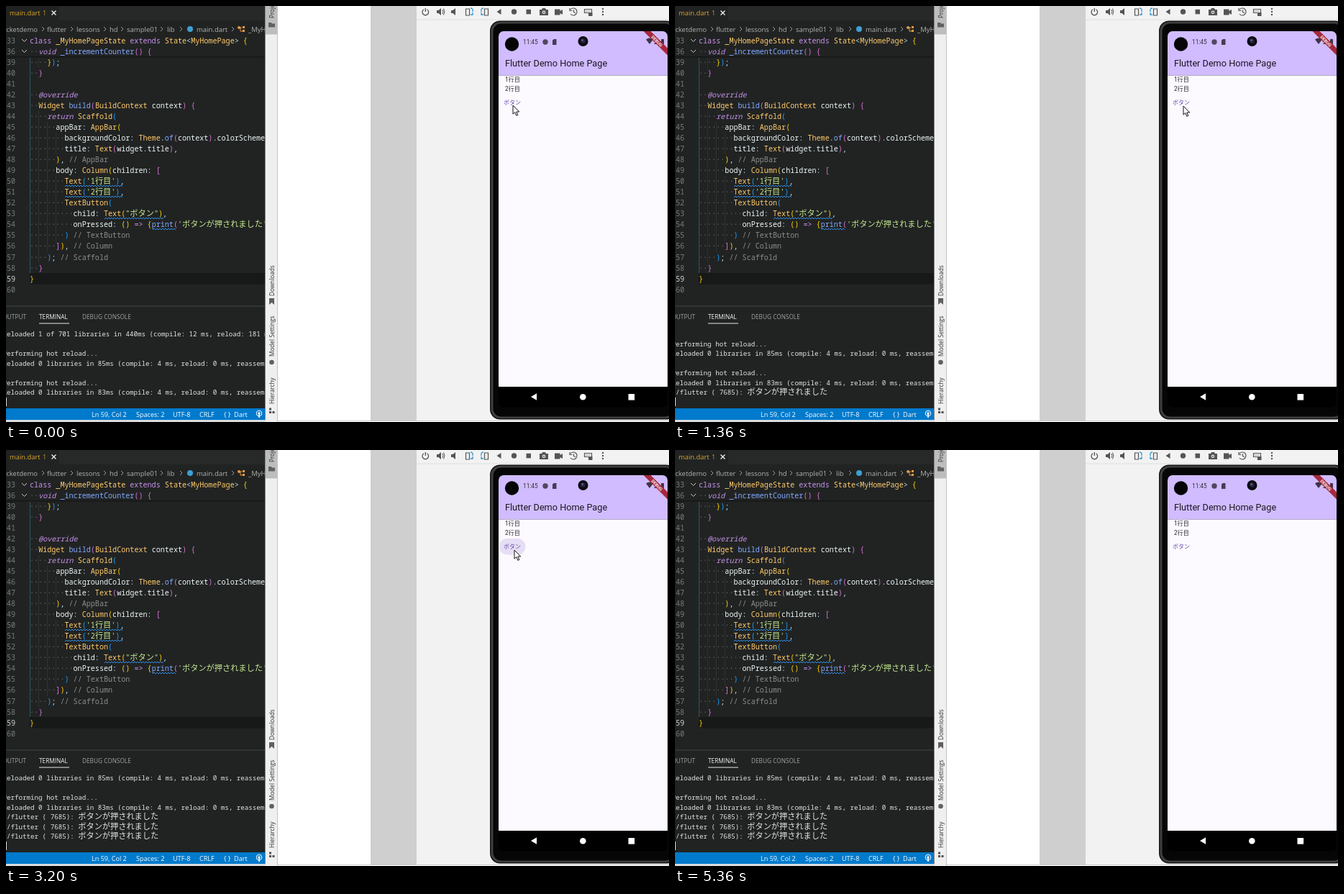
Recreate the animation shown at these times as an HTML page. Size 922 px wide and 578 px high, loop 5.44 s.

```html
<!DOCTYPE html>
<html lang="ja">
<head>
<meta charset="utf-8">
<style>
html, body { margin: 0; width: 100%; height: 100%; overflow: hidden; background: #fff; }
svg { display: block; width: 922px; height: 578px; }
text { white-space: pre; }
.ui { font-family: "Open Sans", "Noto Sans", sans-serif; }
.mono { font-family: "Noto Sans Mono", "Noto Sans CJK JP", monospace; font-weight: 500; }
.cjk { font-family: "Noto Sans CJK JP", "Noto Sans CJK", sans-serif; font-weight: 400; }
.app { font-family: Roboto, "Noto Sans CJK JP", sans-serif; }
</style>
</head>
<body>
<svg id="stage" viewBox="0 0 922 578" xmlns="http://www.w3.org/2000/svg"></svg>
<script>
const LOOP = 5440, STEP = 80;
const BG = '#212323';

const escape = s => s.replace(/&/g, '&amp;').replace(/</g, '&lt;').replace(/>/g, '&gt;');
const rect = (x, y, w, h, fill, extra = '') =>
  `<rect x="${x}" y="${y}" width="${w}" height="${h}" fill="${fill}" ${extra}/>`;
const circle = (x, y, r, fill, extra = '') =>
  `<circle cx="${x}" cy="${y}" r="${r}" fill="${fill}" ${extra}/>`;
const path = (d, fill, extra = '') => `<path d="${d}" fill="${fill}" ${extra}/>`;
const line = (d, color, width = 1, extra = '') =>
  path(d, 'none', `stroke="${color}" stroke-width="${width}" ${extra}`);
const rawText = (x, y, markup, size, fill, cls, extra = '') =>
  `<text x="${x}" y="${y}" font-size="${size}" fill="${fill}" class="${cls}" ${extra}>${markup}</text>`;
const label = (x, y, s, size, fill, cls = 'ui', extra = '') =>
  rawText(x, y, escape(s), size, fill, cls, extra);

// Full-width characters are set larger than the code around them.
const wide = s => escape(s).replace(/[\u3040-\u30ff\u4e00-\u9fff]+/g,
  run => `<tspan class="cjk" font-size="11.2">${run}</tspan>`);

// Code colouring
const BRACKETS = ['#ffd700', '#da70d6', '#179fff'];
const TOKENS = [
  [/^\/\/.*/, '#8b8d8d'],
  [/^'[^']*'?|^"[^"]*"/, '#c3e88d'],
  [/^(void|return|@override)\b/, '#c792ea', 'italic'],
  [/^(class|extends)\b/, '#c792ea'],
  [/^(_MyHomePageState|State|MyHomePage|Widget|BuildContext|Scaffold|AppBar|Theme|TextButton|Text|Column)\b/, '#ffcb6b'],
  [/^(_incrementCounter|build|of|print)\b(?=\()/, '#82aaff'],
  [/^ +/, BG],
  [/^\w+/, '#eef6f6'],
  [/^=>/, '#c792ea'],
  [/^[^\w\s]/, '#b3dfee']
];
let depth = 0;
function colorize(source) {
  const indent = source.match(/^ */)[0].length;
  let rest = source.slice(indent);
  let out = `<tspan fill="#686e70">${'·'.repeat(indent)}</tspan>`;
  while (rest) {
    const [rule, color, style] = TOKENS.find(([r]) => r.test(rest));
    const word = rest.match(rule)[0];
    let fill = color;
    if (/^[([{]$/.test(word)) fill = BRACKETS[depth++ % 3];
    else if (/^[)\]}]$/.test(word)) fill = BRACKETS[--depth % 3];
    out += `<tspan fill="${fill}"${style ? ' font-style="italic"' : ''}>${wide(word)}</tspan>`;
    rest = rest.slice(word.length);
  }
  return out;
}
const CODE = [
  '    });',
  '  }',
  '',
  '  @override',
  '  Widget build(BuildContext context) {',
  '    return Scaffold(',
  '      appBar: AppBar(',
  '        backgroundColor: Theme.of(context).colorScheme.inversePrimary,',
  '        title: Text(widget.title),',
  '      ), // AppBar',
  '      body: Column(children: [',
  "        Text('1行目'),",
  "        Text('2行目'),",
  '        TextButton(',
  '          child: Text("ボタン"),',
  "          onPressed: () => {print('ボタンが押されました')},",
  '        ) // TextButton',
  '      ]), // Column',
  '    ); // Scaffold',
  '  }',
  '}',
  ''
];
const codeRow = (number, y, source) =>
  label(1, y + 3.6, String(number), 10.1, number === 59 ? '#d0d0d0' : '#767b7d', 'mono') +
  rawText(33, y + 3.6, colorize(source), 10.1, '#eef6f6', 'mono');
function squiggle(x1, x2, y) {
  let d = `M${x1} ${y}`;
  for (let x = x1, up = true; x < x2; x += 2, up = !up) d += `l2 ${up ? -2 : 2}`;
  return line(d, '#2f8ee8', 1);
}

function editor() {
  let s = rect(0, 0, 361, 575, BG) + rect(74, 0, 287, 20, '#272929');
  s += label(5, 13, 'main.dart', 9.4, '#dda72a') + label(51, 13, '1', 9, '#c2942a');
  s += line('M63.5 6.5l6 6m0-6l-6 6', '#f0f0f0', 1.3);

  s += label(44, 35.5, 'pocketdemo', 9.5, '#b0b2b2', 'ui', 'text-anchor="end"');
  [[57, 'flutter'], [98, 'lessons'], [144, 'hd'], [168, 'sample01'], [224, 'lib'], [265, 'main.dart'], [337, '_MyHomePageState']]
    .forEach(([x, name]) => s += label(x, 35.5, name, 9.5, '#b0b2b2'));
  [50, 90, 136, 160, 215, 242, 314].forEach(x => s += line(`M${x} 29l3 3l-3 3`, '#999c9c'));
  s += circle(256, 32, 4, '#3f9fd3');
  s += line('M324 30h4m-2 0v5h4', '#e59b45') + circle(324, 30, 2, '#e59b45') +
    rect(329, 28, 3, 3, '#e59b45') + rect(329, 33, 3, 3, '#e59b45');

  s += rect(33, 371, 328, 15.5, '#171919');
  s += codeRow(33, 48, 'class _MyHomePageState extends State<MyHomePage> {');
  s += codeRow(36, 63, '  void _incrementCounter() {');
  [46, 61].forEach(y => s += line(`M22 ${y}l3.5 3.5l3.5-3.5`, '#c8caca'));
  s += rect(0, 70, 361, 1.5, '#151717');
  s += line('M33.5 72V371', '#2d5660') + line('M45.5 72V86M45.5 146V357M57.5 161V342M69.5 176V206M69.5 236V327', '#34383a', .7);
  depth = 4;
  CODE.forEach((row, i) => s += codeRow(39 + i, 78 + i * 15.05, row));
  s += squiggle(82, 162, 251) + squiggle(82, 162, 266) + squiggle(137, 219, 296) + squiggle(204, 236, 311);

  s += rect(0, 416.5, 361, 1, '#434646');
  s += label(28, 435, 'OUTPUT', 8.27, '#a0a3a3', 'ui', 'text-anchor="end"');
  s += label(46, 435, 'TERMINAL', 8.27, '#f4f4f4') + label(106, 435, 'DEBUG CONSOLE', 8.27, '#a0a3a3');
  s += rect(46, 440.5, 42, 1, '#e8e8e8');
  s += '<g id="terminal"></g>' + rect(0, 544, 1, 12, '#dddddd');

  s += rect(0, 559, 361, 16, '#007acc');
  [[119, 'Ln 59, Col 2'], [181, 'Spaces: 2'], [232, 'UTF-8'], [269, 'CRLF'], [303, '{ }'], [317, 'Dart']]
    .forEach(([x, name]) => s += label(x, 570.5, name, 9.1, '#fff'));
  s += circle(352, 566, 3.8, 'none', 'stroke="#fff"') + circle(352, 566, 1.7, '#fff') + rect(351.2, 567, 1.6, 5, '#fff');
  return `<g clip-path="url(#editorClip)">${s}</g>`;
}

function sidebar() {
  const vertical = (y, name) => label(0, 0, name, 8.2, '#303030', 'ui', `transform="translate(373 ${y}) rotate(-90)"`);
  let s = rect(360, 0, 18, 578, '#efefef') + rect(361, 0, 16, 39.5, '#bdbdbd');
  s += rect(360, 0, 1, 578, '#8c8c8c') + rect(377, 0, 1, 578, '#c4c4c4');
  s += vertical(17, 'Project') + vertical(403, 'Downloads') + vertical(487, 'Model Settings') + vertical(553, 'Hierarchy');
  s += path('M365 23h4l1 1.5h4v5h-9z', '#606060');
  s += path('M366 406h7v9l-3.5-3l-3.5 3z', '#606060');
  s += circle(369.5, 495, 3.3, '#606060');
  s += rect(366, 563, 3, 3, '#505050') + rect(370.5, 563, 3, 3, '#505050') + rect(366, 558.5, 3, 3, '#505050');
  return s;
}

function toolbar() {
  const ink = '#555';
  let s = line('M581 4.8a4.3 4.3 0 1 0 4.6 0M583.3 3v5', ink, 1.3);
  [601, 621].forEach(x => s += path(`M${x - 2} 6h2.5l3.5-3v10l-3.5-3h-2.5z`, ink));
  s += line('M607 5q2 3 0 6M608.5 3.5q3 4.5 0 9', ink);
  s += line('M639.5 4h5v9h-5z', ink, 1.2) + line('M646 3q4 0 3 5M649 9v3h-3', '#2a95cf', 1.3);
  s += line('M665.5 4h5v9h-5z', ink, 1.2) + line('M664 3q-4 0-3 5M661 9v3h3', '#2a95cf', 1.3);
  s += path('M682.5 8l6-4v8z', ink) + circle(706.5, 8, 3.7, ink) + rect(723.5, 4.8, 6.5, 6.5, ink);
  s += path('M742 5h3l1-2h4l1 2h3v8h-12z', ink) + circle(748, 8.8, 2.2, '#f2f2f2') + circle(748, 8.8, 1.1, ink);
  s += path('M763 4.5h7.5v2.5l3.5-2v7l-3.5-2v2.5h-7.5z', ink);
  s += line('M785 5a5 5 0 1 1 0 6M784 3v3.5h3.5M789.5 5.2v3.2l2.5 1.4', ink, 1.2);
  s += line('M804.5 4.5h10v5h-10z', ink, 1.2) + line('M806 7h7', ink, 1.2, 'stroke-dasharray="1.2 1"') + rect(810, 9, 5.5, 5, ink);
  [4, 8, 12].forEach(y => s += circle(830, y, 1.2, ink));
  return s;
}

function phone() {
  let s = rect(673, 20.5, 259, 554, '#161718', 'rx="14"') + rect(674.5, 22, 256, 551, '#3d3f41', 'rx="13"') +
    rect(677.5, 24.5, 250, 546, '#060606', 'rx="11"');
  let app = rect(685, 35, 235, 61.5, '#d0bcff') + rect(685, 96.5, 235, 432.5, '#fdfaff') + rect(685, 529, 235, 29, '#000');
  app += circle(703.5, 53, 9.7, '#050505') + circle(802.5, 49, 7, '#0b0a10') +
    circle(802.5, 48.5, 3.2, '#272341') + circle(801.5, 47.5, 1.2, '#6e64a2');
  app += label(719, 53, '11:45', 8.3, '#37303f', 'app');
  app += circle(750, 50, 3.7, '#51475f') + path('M760 47.5l2-1.5h3.5v8h-5.5z', '#463c54');
  app += path('M890 46.5q5-4 10 0l-5 6.5z', '#403449') + path('M907 46v7h-6z', '#403449') +
    rect(911, 46, 4, 8, '#403449', 'rx=".7"');
  app += path('M886.5 35h10l23.5 23.5v10z', '#a5283d');
  app += label(0, 2.2, 'DEBUG', 6, '#fff', 'app', 'transform="translate(905.3 48.8) rotate(45)" text-anchor="middle" font-weight="700"');
  app += label(694, 84.3, 'Flutter Demo Home Page', 12.7, '#1d1724', 'app');
  app += label(694, 105.4, '1行目', 8.2, '#292530', 'app') + label(694, 117.6, '2行目', 8.2, '#292530', 'app');
  app += rect(686, 123, 36.5, 22.5, '#e6def4', 'id="ripple" rx="11.25"');
  app += label(692, 137.3, 'ボタン', 8, '#6a4cae', 'cjk');
  app += path('M730 543l8-4.7v9.4z', '#fff') + circle(802.3, 543.2, 4.3, '#fff') + rect(865.5, 539, 8.6, 8.6, '#fff');
  return s + `<g clip-path="url(#screenClip)">${app}</g>`;
}

document.getElementById('stage').innerHTML =
  `<defs><clipPath id="editorClip"><rect width="360" height="578"/></clipPath>
  <clipPath id="screenClip"><rect x="685" y="35" width="235" height="522.5" rx="7"/></clipPath></defs>` +
  rect(0, 0, 922, 578, '#fff') + rect(507, 0, 64, 576, '#cfcfcf') + rect(571, 0, 351, 576, '#f2f2f2') +
  rect(571, 18.5, 351, 1, '#e2e2e2') +
  editor() + sidebar() + toolbar() + phone() +
  rect(0, 575, 361, 3, '#d9dcdd') + rect(378, 576, 544, 1, '#c9c9c9') +
  `<g id="pointer">${path('M0 0V12.2L2.8 9.6L4.8 14.3L6.8 13.5L4.8 9H8.7Z', '#fff', 'stroke="#111" stroke-width="1"')}</g>
  <g id="beam">${line('M-2.5 0.5h2l.5.5l.5-.5h2M0 1V12M-2.5 12.5h2l.5-.5l.5.5h2', '#b8baba', .9)}</g>`;

const [terminal, ripple, pointer, beam] =
  ['terminal', 'ripple', 'pointer', 'beam'].map(id => document.getElementById(id));

const PRESSED = 'I/flutter ( 7685): ボタンが押されました';
const LOG = [
  'Reloaded 1 of 701 libraries in 440ms (compile: 12 ms, reload: 181 ms)',
  '', 'Performing hot reload...',
  'Reloaded 0 libraries in 85ms (compile: 4 ms, reload: 0 ms, reassemble)',
  '', 'Performing hot reload...',
  'Reloaded 0 libraries in 83ms (compile: 4 ms, reload: 0 ms, reassemble)',
  PRESSED, PRESSED, PRESSED
];
const PRINTS = [1040, 2480, 3200];
const GLOW = [[0, 0], [800, 0], [880, .35], [1040, 1], [1360, 0], [2400, 0], [2560, 1],
  [2800, 1], [2960, 0], [3040, 0], [3200, 1], [3440, 0]];
const TRAIL = [[0, 705, 138], [400, 705, 138], [880, 707, 136], [1200, 707, 139], [3200, 707, 139],
  [3680, 165, 505], [3920, 165, 505], [4400, 451, 230], [4560, 451, 230], [5040, 363, 305]];

const ease = u => u * u * (3 - 2 * u);
function sample(keys, t) {
  const next = keys.findIndex(k => k[0] > t);
  if (next < 0) return keys[keys.length - 1].slice(1);
  const a = keys[next - 1], b = keys[next];
  const u = ease((t - a[0]) / (b[0] - a[0]));
  return a.slice(1).map((v, i) => v + (b[i + 1] - v) * u);
}

let shown = -1;
function draw(time) {
  const t = Math.floor((time % LOOP) / STEP) * STEP;
  const count = PRINTS.filter(p => t >= p).length;
  if (count !== shown) {
    shown = count;
    terminal.innerHTML = LOG.slice(count, count + 7).map((row, i) =>
      rawText(-4.5, 459.3 + i * 13.48, wide(row), 9.2, '#e2e4e4', 'mono')).join('');
  }
  ripple.setAttribute('opacity', sample(GLOW, t)[0]);
  const [x, y] = sample(TRAIL, t);
  const overText = x < 360;
  const visible = t < 5120;
  pointer.setAttribute('transform', `translate(${x} ${y})`);
  beam.setAttribute('transform', `translate(${x} ${y})`);
  pointer.setAttribute('visibility', visible && !overText ? 'visible' : 'hidden');
  beam.setAttribute('visibility', visible && overText ? 'visible' : 'hidden');
}

const start = performance.now();
function tick() {
  draw(performance.now() - start);
  requestAnimationFrame(tick);
}
tick();
</script>
</body>
</html>
```
